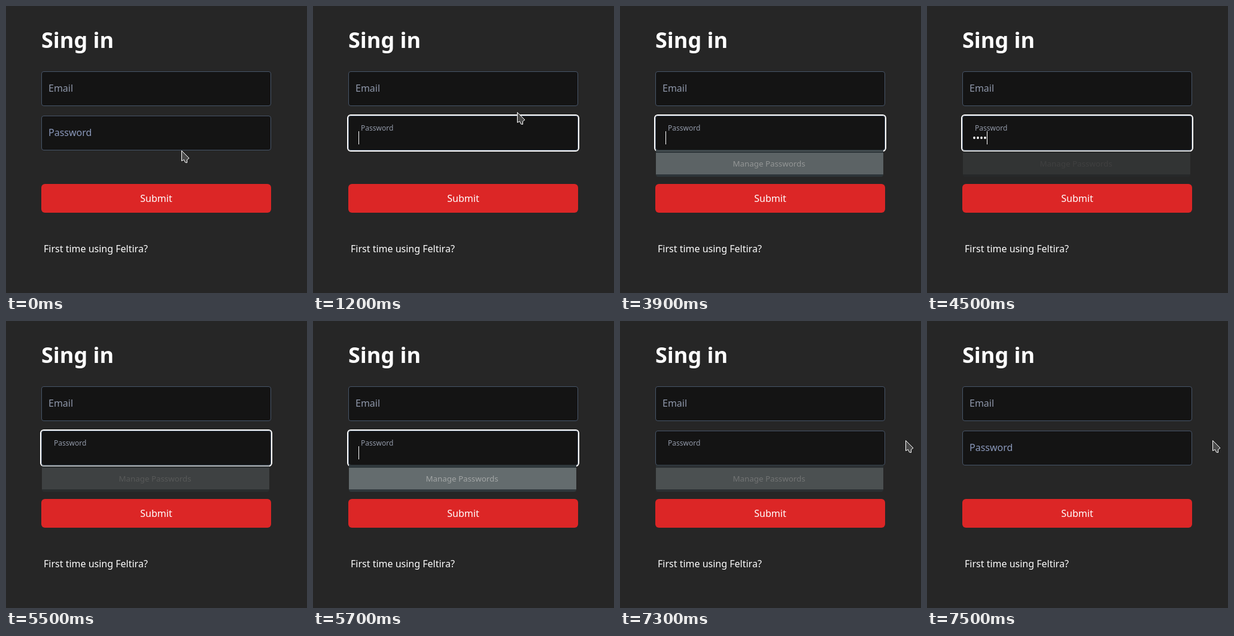
These frames come from a looping animation (503x479 px, 8 s). An HTML page:

```html
<!DOCTYPE html>
<html lang="en">
<head>
<meta charset="utf-8">
<title>Sign-in form</title>
<style>
  html, body { margin: 0; width: 100%; height: 100%; overflow: hidden; background: #262626; }
  svg { display: block; font: 16px "Noto Sans", sans-serif; fill: #fff; }
  .field { fill: #141414; stroke: #475569; }
</style>
</head>
<body>
<svg width="503" height="479" viewBox="0 0 503 479">
  <text x="59" y="70" font-size="36" font-weight="700">Sing in</text>

  <rect class="field" x="59.5" y="109.5" width="383" height="57" rx="3.5"/>
  <text x="71" y="143" fill="#8f98ab">Email</text>

  <rect class="field" x="59.5" y="183.5" width="383" height="57" rx="3.5"/>
  <rect id="ring" x="58" y="182" width="386" height="60" rx="5" fill="none" stroke="#fff" stroke-width="2"/>
  <text id="label">Password</text>
  <text id="dots" x="76" y="226"></text>
  <rect id="caret" y="209" width="1" height="22"/>

  <rect x="59" y="297" width="384" height="48" rx="6" fill="#dc2626"/>
  <text x="251" y="327" text-anchor="middle">Submit</text>
  <text x="63" y="411">First time using Feltira?</text>

  <g id="popup">
    <path d="M60 240H440V281a4 4 0 0 1-4 4H64a4 4 0 0 1-4-4Z" fill="#2f383c"/>
    <rect x="60" y="245" width="380" height="36" fill="#646c6e"/>
    <text x="249" y="268" font-size="13.333" text-anchor="middle" fill="#a2a5a5">Manage Passwords</text>
  </g>

  <path id="pointer" d="M.5.5V17.5L4.5 15.5 6.5 20 9.5 20.5 9.5 15.5 13 13Z"
        fill="#4a4a4a" stroke="#fff" stroke-linejoin="round"/>
</svg>
<script>
const LOOP = 8000, STEP = 100;
const FOCUS = 500, BLUR = 7300, FLOAT = 200, FADE = 350;
const $ = id => document.getElementById(id);
const [ring, label, dots, caret, popup, pointer] =
  ['ring', 'label', 'dots', 'caret', 'popup', 'pointer'].map($);

const within = (t, from, to) => t >= from && t < to;
const ramp = (t, start, length) => Math.min(1, Math.max(0, (t - start) / length));
const smooth = p => p * p * (3 - 2 * p);
const easeOut = p => 1 - (1 - p) ** 2;
const mix = (a, b, p) => a + (b - a) * p;
const show = (el, on) => el.setAttribute('visibility', on ? 'visible' : 'hidden');

// Moves along a parabola that rises `arc` pixels above the chord.
const glide = ([x0, y0], [x1, y1], arc, p) =>
  [mix(x0, x1, p), mix(y0, y1, p) - 4 * arc * p * (1 - p)];

function pointerAt(t) {
  if (t < 600) return glide([293, 241], [267, 211], 0, ramp(t, 0, 300));
  if (t < 2100) return glide([267, 211], [341, 177], 22, ramp(t, 600, 600));
  return glide([341, 200], [477, 199], 34, easeOut(ramp(t, 6500, 660)));
}

const fade = (t, start) => smooth(ramp(t, start, FADE));
const popupOpacity = t => fade(t, 3625) - fade(t, 4250) + fade(t, 5350) - fade(t, 7150);

function typedCount(t) {
  if (within(t, 2100, 3600)) return Math.ceil(11 * ramp(t, 2000, 700));
  if (within(t, 4400, 5400)) return Math.ceil(5 * ramp(t, 4300, 300));
  return 0;
}

const caretHidden = t =>
  within(t, 1700, 2100) || within(t, 3000, 3600) || within(t, 5400, 5600);

function draw(t) {
  const focused = within(t, FOCUS, BLUR);
  show(ring, focused);

  const up = ramp(t, FOCUS, FLOAT) - ramp(t, BLUR, FLOAT);
  label.setAttribute('transform',
    `translate(${71 + 9 * up} ${217 - 9.5 * up}) scale(${1 - up / 4})`);
  label.setAttribute('fill', up > .5 ? '#9299a8' : '#8a98ba');

  const count = typedCount(t);
  dots.textContent = '•'.repeat(count);
  caret.setAttribute('x', 76 + 6 * count);
  show(caret, focused && !caretHidden(t));

  popup.setAttribute('opacity', popupOpacity(t));

  const [x, y] = pointerAt(t).map(Math.round);
  pointer.setAttribute('transform', `translate(${x} ${y})`);
  show(pointer, !within(t, 2100, 6500));
}

const start = performance.now();
function frame() {
  const t = (performance.now() - start) % LOOP;
  draw(Math.floor(t / STEP) * STEP);
  requestAnimationFrame(frame);
}
frame();
</script>
</body>
</html>
```
